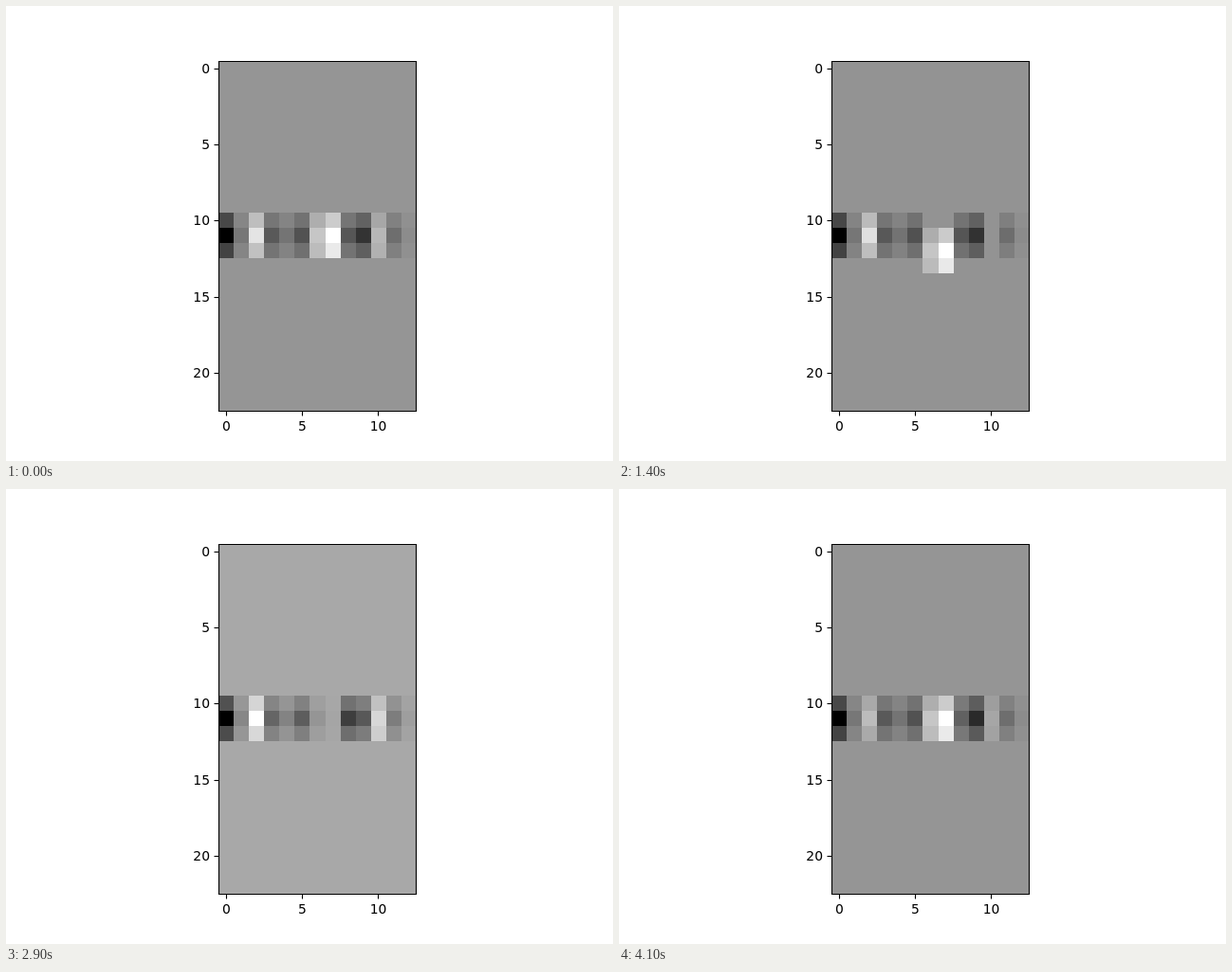
Recreate the animation shown at these times as an HTML page. Size 640 px wide and 480 px high, loop 4200 ms.

```html
<!DOCTYPE html>
<html lang="en">
<head>
<meta charset="utf-8">
<title>Heat map</title>
<style>
  html, body { margin: 0; width: 100%; height: 100%; overflow: hidden; background: #fff; }
  svg { display: block; }
  text { font: 13.89px "DejaVu Sans", sans-serif; }
  .axis { fill: none; stroke: #000; stroke-width: 1.11; }
</style>
</head>
<body>
<svg id="plot" width="640" height="480" viewBox="0 0 640 480"></svg>
<script>
const LOOP = 4200, STEP = 100;
const COLS = 13, ROWS = 23, FIRST = 9, BAND = 5;
const MIN = -1;

// Key points of the parts that move; levels are relative to the still ground at 0.
const keys = [
  { t: 0,    lead: 0.53, crest: 0.71,  dip: 0,    tail: 0.23, sag: 0 },
  { t: 900,  lead: 0.53, crest: 0.95,  dip: -0.3, tail: 0.3,  sag: 0 },
  { t: 1400, lead: 0.52, crest: 0.73,  dip: 0,    tail: 0,    sag: 1 },
  { t: 2000, lead: 0.42, crest: -0.26, dip: 0.9,  tail: 0.56, sag: 0 },
  { t: 2500, lead: 0.68, crest: 0.09,  dip: 0,    tail: 0.21, sag: 0 },
  { t: 3300, lead: 0.35, crest: -0.13, dip: 1.2,  tail: 0.35, sag: 0 },
  { t: 4100, lead: 0.26, crest: 0.71,  dip: -0.2, tail: 0.11, sag: 0 }
];

const svg = document.getElementById("plot");

function add(tag, attrs, text) {
  const el = document.createElementNS("http://www.w3.org/2000/svg", tag);
  for (const name in attrs) el.setAttribute(name, attrs[name]);
  if (text !== undefined) el.textContent = text;
  return svg.appendChild(el);
}
const box = (x, y, width, height) => add("rect", { x, y, width, height });
const axis = d => add("path", { d, class: "axis" });
const mix = (a, b, k) => a + (b - a) * k;

// Cell edges lie on whole pixels.
const edgeX = col => 224 + Math.round(col * 209 / COLS);
const edgeY = row => 57 + Math.round(row * 370 / ROWS);

function poseAt(t) {
  const i = Math.max(1, keys.findIndex(key => key.t >= t));
  const a = keys[i - 1], b = keys[i];
  const k = (t - a.t) / (b.t - a.t);
  const pose = {};
  for (const name in a) pose[name] = mix(a[name], b[name], k);
  return pose;
}

// Levels along the middle row
const middle = ({ lead, crest, dip, tail }) => [
  MIN, -0.2, lead, -0.4, -0.22, -0.45,
  0.6 * crest - 0.1, crest,
  -0.42 - 0.35 * dip, -0.66 + 0.3 * dip,
  tail, -0.26, -0.06
];

// The middle row fades out above and below; the crest can sag downwards.
function levels(pose) {
  const grid = [];
  middle(pose).forEach((level, col) => {
    const foot = col > 5 && level > 0 ? 0.8 : 0.55;
    const fade = [0, 0.52, 1, foot, 0];
    const sag = col === 6 || col === 7 ? pose.sag : 0;
    for (let row = 0; row < BAND; row++) {
      grid[row * COLS + col] = level * mix(fade[row], fade[row - 1] || 0, sag);
    }
  });
  return grid;
}

const ground = box(224, 58, 209, 370);
const cells = Array.from({ length: BAND * COLS }, (_, i) => {
  const col = i % COLS, row = FIRST + Math.floor(i / COLS);
  const x = edgeX(col), y = edgeY(row);
  return box(x, y, edgeX(col + 1) - x, edgeY(row + 1) - y);
});

// Frame, ticks and labels
axis("M224.5 58.5H432.5V427.5H224.5Z");
for (let n = 0; n < ROWS; n += 5) {
  const y = Math.round(57.6 + (n + 0.5) * 369.6 / ROWS);
  axis(`M219.5 ${y + 0.5}H224`);
  add("text", { x: 215, y: y + 5, "text-anchor": "end" }, n);
}
for (let n = 0; n < COLS; n += 5) {
  const x = Math.round(223.55 + (n + 0.5) * 208.9 / COLS);
  axis(`M${x + 0.5} 428V432.5`);
  add("text", { x: x + 0.5, y: 448, "text-anchor": "middle" }, n);
}

let shown = -1;
function draw(now) {
  let t = Math.floor((now % LOOP) / STEP) * STEP;
  if (t < 2 * STEP) t = 0;
  if (t !== shown) {
    shown = t;
    const grid = levels(poseAt(t));
    const max = Math.max(...grid);
    // Stretch the levels so that the lowest is black and the highest white.
    const paint = (el, level) => {
      const v = Math.round(255 * (level - MIN) / (max - MIN));
      el.setAttribute("fill", `rgb(${v},${v},${v})`);
    };
    paint(ground, 0);
    cells.forEach((cell, i) => paint(cell, grid[i]));
  }
  requestAnimationFrame(() => draw(performance.now() - start));
}
const start = performance.now();
draw(0);
</script>
</body>
</html>
```
